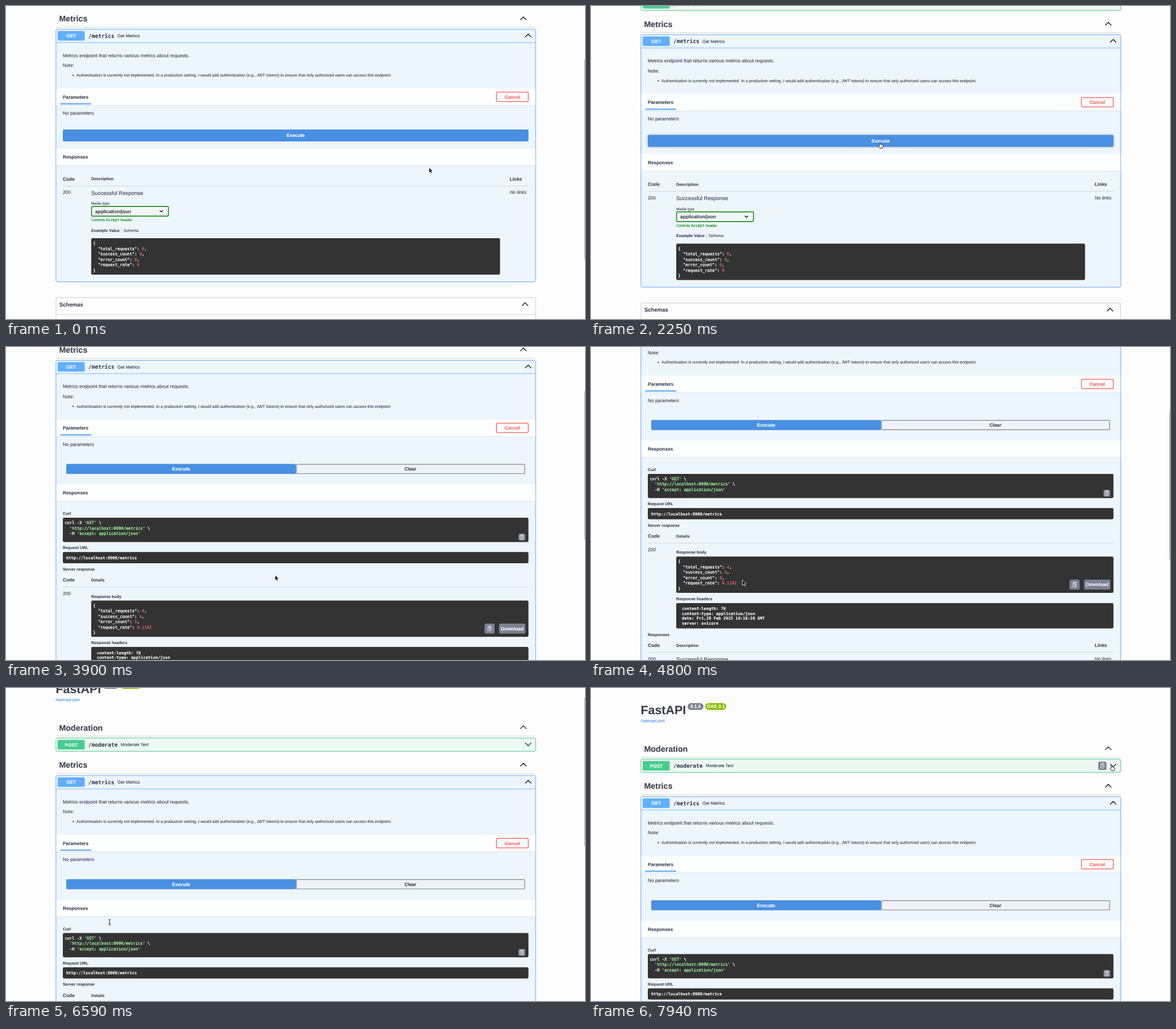
An HTML page for the animation above (8 s loop, 1019 by 550 pixels).

```html
<!DOCTYPE html>
<html lang="en">
<head>
<meta charset="utf-8">
<title>API docs</title>
<style>
  html, body { margin: 0; width: 100%; height: 100%; overflow: hidden; background: #fdfdfd; }
  svg { display: block; width: 1019px; height: 550px; }
  text {
    font-family: "Liberation Sans", Arial, sans-serif;
    color: #3b4151;
    fill: currentColor;
    stroke: currentColor;
    stroke-width: 0.12;
    white-space: pre;
    text-rendering: geometricPrecision;
  }
  .b { font-weight: 700; }
  .i { font-style: italic; }
  .m { font-family: "DejaVu Sans Mono", monospace; }
  .code { stroke-width: 0.3; }
  .w { color: #fff; }
  .str { color: #a2fca2; }
  .num { color: #d36363; }
  .red { color: #ff6060; }
  .ok { color: #008000; }
  .link { color: #4990e2; }
  .lift { filter: drop-shadow(0 0.6px 0.6px rgba(0, 0, 0, .12)); }
  .halo { filter: drop-shadow(0 0 1px rgba(0, 0, 0, .16)); }
  .glow { filter: blur(1.4px); }
</style>
</head>
<body>
<svg id="stage" viewBox="0 0 1019 550" xmlns="http://www.w3.org/2000/svg"></svg>
<script>
const LOOP = 8000, STEP = 150;
const S = 7.13, M = 8.31, L = 9.5, TINY = 6.53;           // font sizes
const LEFT = 88, RIGHT = 932, IN = 100, COL = 150, OUT = 919.5; // column edges
const INK = '#3b4151', BLUE = '#61affe', GREEN = '#49cc90', GREY = '#7d8293';
const RULE = '#c5c7cb', TABLE_RULE = '#c3cad3', ACTION = '#4990e2', PAGE = '#fdfdfd';

// Text is placed by the middle of its capital letters.
const text = (x, cy, size, str, cls = '', anchor = 'start') =>
  `<text x="${x}" y="${cy + size * 0.36}" font-size="${size}" class="${cls}" text-anchor="${anchor}">${str}</text>`;
const rect = (x, y, x2, y2, fill, r = 0, more = '') =>
  `<rect x="${x}" y="${y}" width="${x2 - x}" height="${y2 - y}" rx="${r}" fill="${fill}" ${more}/>`;
const line = (x, x2, y, color, w = 0.7) =>
  `<path d="M${x} ${y}H${x2}" stroke="${color}" stroke-width="${w}"/>`;
const group = (id, body) => `<g id="${id}">${body}</g>`;
const span = (cls, str) => `<tspan class="${cls}">${str}</tspan>`;
const stroke = (color, w) => `stroke="${color}" stroke-width="${w}" stroke-linejoin="round"`;
const label = (cy, str) => text(IN, cy, S, str, 'b');
const title = (cy, str) => text(IN, cy, M, str, 'b');

const chevron = (x, y, up, w = 5) => {
  const d = up ? w / 2 : -w / 2;
  return `<path d="M${x - w} ${y + d}L${x} ${y - d}L${x + w} ${y + d}" fill="none" ${stroke('#111', 1.25)} stroke-linecap="round"/>`;
};

const button = (x, cy, x2, h, fill, str) =>
  rect(x, cy - h / 2, x2, cy + h / 2, fill, 2.2, 'class="lift"') +
  text((x + x2) / 2, cy, M, str, 'b w', 'middle');

const copyButton = (cx, cy, size) =>
  rect(cx - size / 2, cy - size / 2, cx + size / 2, cy + size / 2, GREY, 2.2) +
  `<path transform="translate(${cx} ${cy})" fill="none" ${stroke('#fff', 0.8)}
    d="M3 -1V-3.3H-3V3.8H3V2.4M-1.4 -3.3V-4.4H1.4V-3.3M4 0.7H-0.3M1.2 -0.8L-0.3 0.7L1.2 2.2M-1.8 -1.4H1.6"/>`;

const panel = (x, y, x2, y2) => rect(x, y, x2, y2, '#333', 2.4);
const codeLines = (x, cy, step, rows, cls = 'm w code') =>
  rows.map((row, i) => text(x, cy + i * step, S, row, cls)).join('');

const json = (cy, values) => {
  const keys = ['total_requests', 'success_count', 'error_count', 'request_rate'];
  const rows = keys.map((k, i) => `  "${k}": ${span('num', values[i])}${i < 3 ? ',' : ''}`);
  return codeLines(153.3, cy, 9.53, ['{', ...rows, '}']);
};

const tagHeader = (name, cy) =>
  text(93.5, cy, 14.26, name, 'b') + chevron(910.5, cy - 0.5, true) + line(LEFT, RIGHT, cy + 15, RULE);

const summary = (method, path, note, noteX, cy, color, up) =>
  rect(91, cy - 8.4, 138.5, cy + 8.4, color, 1.8) +
  text(114.8, cy, M, method, 'b w', 'middle') +
  text(145, cy, L, path, 'b m') + text(noteX, cy, 7.72, note) + chevron(919, cy - 0.6, up);

const band = (cy, name) =>
  rect(88.6, cy - 14.9, 931.4, cy + 14.8, '#fdfefe') +
  line(88.6, 931.4, cy + 15, '#d9e1e9', 0.8) + title(cy, name);

const block = (y, y2, fill, color) =>
  rect(LEFT, y, RIGHT, y2, fill, 2.4, stroke(color, 0.9) + ' class="halo"');

const glow = (id, x, y, x2, y2) =>
  rect(x, y, x2, y2, 'none', 2.4, `id="${id}" class="glow" ${stroke('#000', 2)}`);

const header = () =>
  text(87.5, 38.6, 21.4, 'FastAPI', 'b') +
  rect(170, 26.4, 198, 38.6, GREY, 6.1) + text(184, 32.5, M, '0.1.0', 'b w', 'middle') +
  rect(201, 26.4, 238, 38.6, '#89bf04', 6.1) + text(219.6, 32.5, M, 'OAS 3.1', 'b w', 'middle') +
  text(87.5, 57.3, S, '/openapi.json', 'link') +
  tagHeader('Moderation', 106.4) +
  block(125, 148.2, '#ecf9f3', GREEN) +
  summary('POST', '/moderate', 'Moderate Text', 202, 136.7, GREEN, false) +
  group('rowCopy', copyButton(900, 136.7, 14.5)) +
  tagHeader('Metrics', 172.2);

const intro = () =>
  line(LEFT, RIGHT, 214.3, BLUE, 0.8) +
  summary('GET', '/metrics', 'Get Metrics', 196, 202.3, BLUE, true) +
  text(IN, 236.7, M, 'Metrics endpoint that returns various metrics about requests.') +
  text(IN, 254.5, M, 'Note:') +
  `<circle cx="118.3" cy="271.8" r="1.2" fill="${INK}"/>` +
  text(124, 271.6, S, 'Authentication is currently not implemented. In a production setting, I would add authentication (e.g., JWT tokens) to ensure that only authorized users can access this endpoint.') +
  band(309.7, 'Parameters') +
  rect(95.5, 320.8, COL, 323.1, BLUE) +
  rect(863.2, 301.4, 919.2, 317.8, 'none', 2.2, stroke('#ff6060', 1.3) + ' class="lift"') +
  text(891, 309.7, M, 'Cancel', 'b red', 'middle') +
  text(IN, 338.4, M, 'No parameters');

const responseTable = () =>
  title(453.9, 'Code') + text(COL, 453.9, S, 'Description', 'b') +
  text(886.5, 453.9, M, 'Links', 'b') + line(IN, OUT, 466.3, TABLE_RULE) +
  text(IN, 477.4, M, '200') + text(COL, 478.1, L, 'Successful Response') +
  text(886.5, 477.4, M, 'No links', 'i') +
  text(COL, 496.8, TINY, 'Media type') +
  rect(150.6, 502.2, 286, 519.2, '#f3f6f6', 2.4, stroke('#008000', 1.4)) +
  text(157, 510.6, M, 'application/json', 'b') + chevron(273.5, 510.7, false, 2.5) +
  text(COL, 526, TINY, `Controls ${span('m ok', 'Accept')} header.`, 'ok') +
  text(COL, 544.2, S, 'Example Value', 'b') + rect(203.2, 539.5, 203.8, 548.5, '#b5bbc4') +
  text(207, 544.2, S, 'Schema') +
  panel(COL, 558, 869.5, 622) + json(566.7, [0, 0, 0, 0]);

const idle = () =>
  block(191, 634.5, '#edf5fd', BLUE) + intro() +
  glow('glowMain', IN, 367, OUT, 388) +
  button(IN, 377.5, OUT, 21, ACTION, 'Execute') +
  band(415.5, 'Responses') + responseTable() +
  rect(LEFT, 662.4, RIGHT, 800, 'none', 2.4, stroke(RULE, 0.9)) +
  text(94, 674.3, L, 'Schemas', 'b') + chevron(913.5, 674, true) + line(LEFT, RIGHT, 692, RULE);

const executed = () =>
  block(191, 949.5, '#edf5fd', BLUE) + intro() +
  glow('glowClear', 510.5, 373.5, 913, 390.3) +
  rect(511, 373.6, 912.9, 390, '#edf3f9', 2, stroke('#7f848d', 1.2)) +
  text(711.6, 381.8, M, 'Clear', 'b', 'middle') +
  button(106, 381.8, 510.4, 17.6, ACTION, 'Execute') +
  band(423.7, 'Responses') +
  label(460.4, 'Curl') + panel(IN, 467.6, OUT, 510.2) +
  codeLines(103.5, 476, 9.5, [
    `curl -X ${span('str', "'GET'")} \\`,
    `  ${span('str', "'http://localhost:8000/metrics'")} \\`,
    `  -H ${span('str', "'accept: application/json'")}`]) +
  copyButton(907.9, 501.6, 12) +
  label(520.4, 'Request URL') + panel(IN, 527.7, OUT, 547.4) +
  text(106, 537.8, S, 'http://localhost:8000/metrics', 'm b w') +
  label(557.8, 'Server response') +
  title(577, 'Code') + text(COL, 577, S, 'Details', 'b') + line(IN, OUT, 589.3, TABLE_RULE) +
  text(IN, 600.5, M, '200') + text(COL, 605.6, S, 'Response body', 'b') +
  panel(COL, 613, OUT, 676.8) + json(621.5, [4, 4, 0, '0.1102']) +
  copyButton(851.1, 662.2, 17.6) + button(867.8, 662.2, 914, 17.6, GREY, 'Download') +
  text(COL, 687.3, S, 'Response headers', 'b') + panel(COL, 694.6, OUT, 739.3) +
  codeLines(160, 704.6, 8.38, ['content-length: 76', 'content-type: application/json',
    'date: Fri,28 Feb 2025 16:16:26 GMT', 'server: uvicorn'], 'm b w') +
  label(749.9, 'Responses') +
  `<g transform="translate(0 315)">${responseTable()}</g>`;

// Pointer shapes have their hot spot at 0,0.
const beam = (color, w) =>
  `<path d="M-2.2 -4.8Q0 -4.8 0 -3.6V3.6Q0 4.8 -2.2 4.8M2.2 -4.8Q0 -4.8 0 -3.6M0 3.6Q0 4.8 2.2 4.8M-1.2 1.8H1.2" fill="none" ${stroke(color, w)}/>`;
const pointers = {
  arrow: `<path d="M0 0V9.2L2.1 7.2L3.6 10.6L5.3 9.8L3.8 6.6H6.7Z" fill="#000" ${stroke('#fff', 0.8)}/>`,
  hand: `<path d="M-1 0.2Q0 -0.8 0.9 0.2V3.2Q1.8 2.6 2.5 3.5Q3.4 3 4 3.9Q5.2 3.6 5.4 4.8V6.6Q5.2 8 4.5 8.6V9.8H-0.4L-0.6 8.8Q-2.2 7.2 -2.9 5.6Q-2.6 4.2 -1 5.4Z" fill="#fff" ${stroke('#000', 0.85)}/>`,
  beam: beam('#fff', 2) + beam('#111', 0.9)
};

document.getElementById('stage').innerHTML =
  rect(0, 0, 1019, 550, PAGE) +
  group('page', header() + group('idle', idle()) + group('executed', executed())) +
  rect(1018, 0, 1020, 1, '#a0a0a0', 0.8, 'id="bar"') +
  Object.entries(pointers).map(([k, v]) => group(k, v)).join('');

const ramp = (t, a, b) => Math.min(1, Math.max(0, (t - a) / (b - a)));
const smooth = p => p * p * (3 - 2 * p);
const slowing = p => 1 - (1 - p) ** 3;

// Each move is [start, end, target, easing]; between moves the value rests.
const follow = (from, moves, t) =>
  moves.reduce((v, [a, b, to, ease = smooth]) => v.map((n, i) => n + (to[i] - n) * ease(ramp(t, a, b))), from);

const CLICK = 2700, HOVER_ROW = 7940, SHIFT = 5390;
const scrollMoves = [
  [0, 150, [140.5]], [3750, 4200, [244.7]],
  [6140, 6290, [200.7]], [6290, 6590, [37]], [6590, 7340, [0], slowing]];
const pointerMoves = [
  [300, 1350, [562, 231]], [1350, 1800, [526, 234]], [1950, 2250, [508.7, 240]],
  [3300, 3600, [473.6, 401]], [4350, 4800, [266.4, 409.5]], [4800, 5100, [190, 417]],
  [5100, 5540, [215, 412]], [5540, 5840, [182.3, 411.5]], [7190, 7940, [916.3, 135.6]]];

const shapeAt = t =>
  t >= HOVER_ROW || (t >= 1050 && t < 3450) ? 'hand' : t >= 5840 && t < 7340 ? 'beam' : 'arrow';

// The scroll bar shows at once and fades after the page rests.
const barAt = t => {
  const [on, off] = t < 3900 ? [0, 450] : t < 6290 ? [3900, 4800] : [6290, 7490];
  return t < on ? 0 : 1 - ramp(t, off, off + 450);
};

// The picture advances in even steps, with one slightly short one at SHIFT.
const snap = t => {
  const base = t < SHIFT ? 0 : SHIFT;
  return base + Math.floor((t - base) / STEP) * STEP;
};

const set = (id, attrs) => {
  for (const k in attrs) document.getElementById(id).setAttribute(k, attrs[k]);
};
const show = (id, on) => set(id, { display: on ? 'inline' : 'none' });

function draw(t) {
  const [scroll] = follow([150], scrollMoves, t);
  const [x, y] = follow([744.6, 284], pointerMoves, t);
  const done = t >= CLICK;

  set('page', { transform: `translate(0 ${-scroll})` });
  show('idle', !done);
  show('executed', done);
  show('rowCopy', t >= HOVER_ROW);
  set('glowMain', { opacity: 0.2 * ramp(t, 1950, 2250) });
  set('glowClear', { opacity: 0.2 * (ramp(t, CLICK, 3000) - ramp(t, 3300, 3600)) });
  set('bar', { y: scroll * (done ? 0.46 : 0.62), height: done ? 261 : 353, opacity: barAt(t) });

  const shape = shapeAt(t);
  for (const k in pointers) show(k, k === shape);
  set(shape, { transform: `translate(${x} ${y})` });
}

const start = performance.now();
function tick() {
  draw(snap((performance.now() - start) % LOOP));
  requestAnimationFrame(tick);
}
tick();
</script>
</body>
</html>
```
